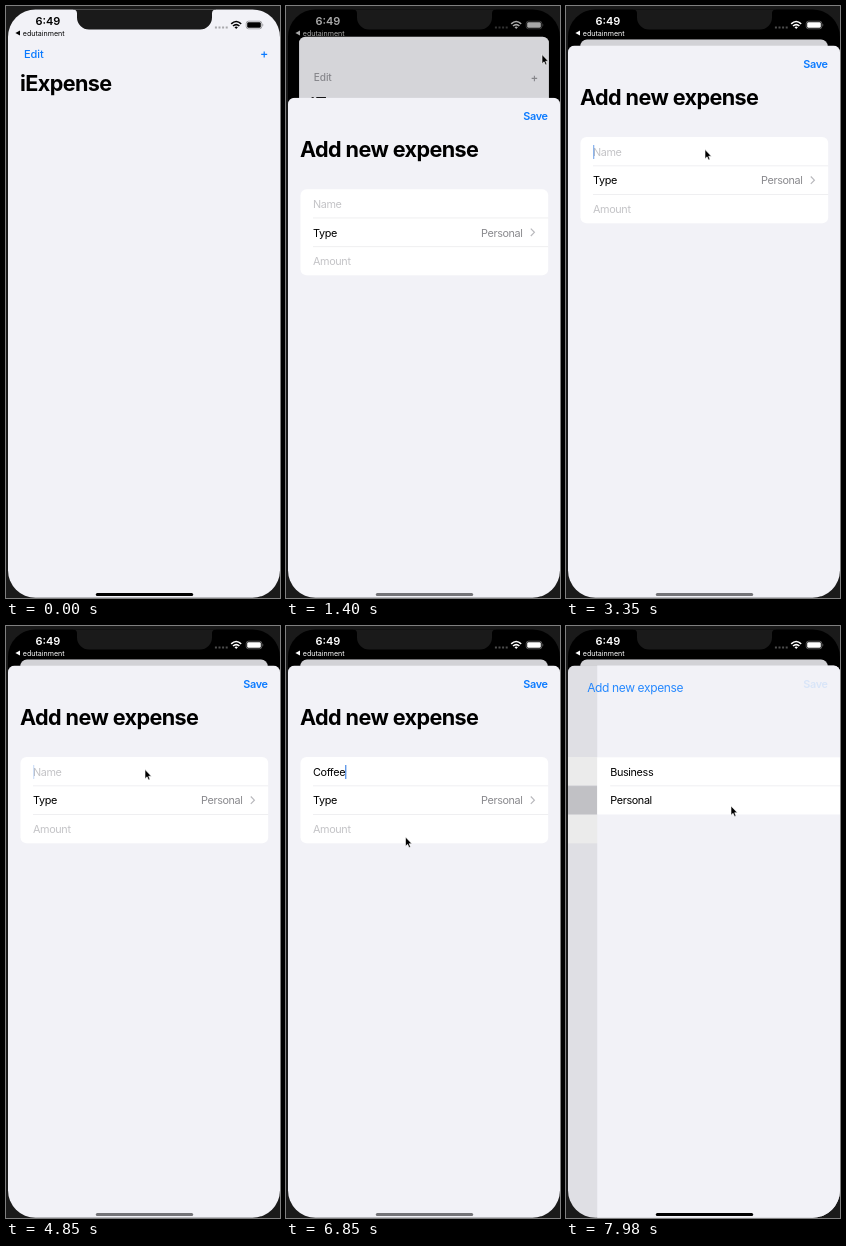
An HTML page that plays this animation: 274x592 px, repeating every 8 s.

```html
<!DOCTYPE html>
<html lang="en">
<head>
<meta charset="utf-8">
<title>Expense list</title>
<style>
html, body { margin: 0; width: 100%; height: 100%; overflow: hidden; background: #1a1a1a; }
svg { display: block; width: 274px; height: 592px; }
text { font: 400 10.85px Inter, "Open Sans", sans-serif; font-optical-sizing: none; letter-spacing: -.38px; white-space: pre; }
.title { font-size: 21.6px; font-weight: 700; letter-spacing: -.6px; }
.back { font-size: 21.6px; letter-spacing: -.66px; }
.strong { font-weight: 600; }
.edit { font-size: 11px; font-weight: 500; letter-spacing: -.1px; }
.clock { font-size: 11px; font-weight: 600; letter-spacing: 0; }
.small { font-size: 7.1px; letter-spacing: 0; }
.hint { fill: #c4c4c7; }
.value { fill: #8a8a8e; }
.link { fill: #0a7aff; }
.bg { fill: #f2f2f7; }
.rule { stroke: #e4e4e8; stroke-width: .6; }
</style>
</head>
<body>
<svg viewBox="0 0 274 592">
  <defs>
    <clipPath id="screen"><rect x="2" y="3.4" width="272" height="588.4" rx="27.5"/></clipPath>
    <clipPath id="sheetClip"><rect x="2" y="39.5" width="272" height="620" rx="6.5"/></clipPath>
  </defs>
  <rect width="274" height="592" fill="#1a1a1a"/>
  <g clip-path="url(#screen)">
    <rect width="274" height="592"/>
    <g id="page">
      <rect id="pageBg" class="bg" x="2" y="3" width="272" height="600"/>
      <g id="pageLinks">
        <text class="edit" x="18" y="51.7">Edit</text>
        <path d="M255.2 48.4h6M258.2 45.4v6" stroke="currentColor" stroke-width="1.2"/>
      </g>
      <text class="title" x="14" y="84.9">iExpense</text>
      <rect id="pageDim" x="2" y="3" width="272" height="600"/>
    </g>

    <g id="sheet"><g clip-path="url(#sheetClip)">
      <rect class="bg" x="2" y="39.5" width="272" height="620"/>
      <g id="form">
        <rect x="14.5" y="131" width="247.7" height="86.2" rx="6" fill="#fff"/>
        <rect id="picked" x="14.5" y="159.8" width="247.7" height="28.6" fill="#d1d1d6"/>
        <path class="rule" d="M27 159.8H262.2M27 188.5H262.2"/>
        <path d="M244.8 170.5l3.6 3.7-3.6 3.7" fill="none" stroke="#b9b9bd" stroke-width="1.2"/>
        <rect id="caret" y="139" width="1.3" height="14" fill="#1f6fde"/>
      </g>
      <rect id="formDim" x="2" y="39" width="272" height="560"/>
      <g id="detail">
        <rect class="bg" x="2" y="39" width="272" height="620"/>
        <rect x="2" y="131.3" width="272" height="57.2" fill="#fff"/>
        <path class="rule" d="M15 159.8H274"/>
      </g>
      <g id="heading">
        <text id="large" class="title">Add new expense</text>
        <text id="back" class="link back">Add new expense</text>
      </g>
      <text id="save" class="link strong" x="237.3" y="61.9">Save</text>
    </g></g>

    <g id="status">
      <text class="clock" x="29.5" y="18.8">6:49</text>
      <path d="M14 24.6v5l-4.6-2.5z"/>
      <text class="small" x="16.8" y="29.7">edutainment</text>
      <path d="M225.2 17.8q5-4.6 10 0M227 20q3.2-2.8 6.4 0" fill="none" stroke="currentColor" stroke-width="1.6"/>
      <path d="M230.2 23.1l-1.7-1.9q1.7-1.3 3.4 0z"/>
      <rect x="240.2" y="15.2" width="15.6" height="7.6" rx="2.2" fill="none" stroke="currentColor" stroke-opacity=".45" stroke-width=".7"/>
      <rect x="241.2" y="16.2" width="13.6" height="5.6" rx="1.3"/>
      <path d="M256.6 17.6q1.5 1.4 0 2.8z" opacity=".5"/>
      <path d="M208.9 21.6h13" stroke="currentColor" stroke-width="2" stroke-dasharray="2 1.6" opacity=".3"/>
    </g>
    <path d="M67 2v1.4q4 0 4 4v4.2a12 12 0 0 0 12 12h111a12 12 0 0 0 12-12v-4.2q0-4 4-4v-1.4z" fill="#1a1a1a"/>
    <rect id="home" x="89.8" y="587" width="97.4" height="3" rx="1.5"/>
  </g>
  <g id="pointer">
    <circle id="ring" r="14" fill="none" stroke="#222" stroke-width="1.2"/>
    <path d="M0 0V9.2L2.1 7.3 3.5 10.5 5 9.9 3.7 6.7H6.4Z" stroke="#fff" stroke-width=".6"/>
  </g>
</svg>
<script>
const $ = Object.fromEntries([...document.querySelectorAll('[id]')].map(e => [e.id, e]));
const LOOP = 8000, STEP = 50, WIDTH = 272, WORD = 'Coffee';

// Pointer: start point, then linear moves
const home = { x: 275, y: 42 };
const moves = [
  { from: 100, to: 500, x: 256, y: 48.5 },
  { from: 1400, to: 1600, x: 186, y: 93 },
  { from: 1600, to: 1850, x: 139, y: 143.5 },
  { from: 6400, to: 6850, x: 119.5, y: 211 },
  { from: 6950, to: 7600, x: 165, y: 180 }
];
const clicks = [850, 2000, 7600];

const clamp = (v, lo = 0, hi = 1) => Math.max(lo, Math.min(hi, v));
const mix = (a, b, k) => a + (b - a) * k;
const move = (el, x, y, s = 1) => el.setAttribute('transform', `translate(${x} ${y}) scale(${s})`);
const fade = (el, v) => el.setAttribute('opacity', v);

function tint(el, color) {
  el.setAttribute('fill', color);
  el.setAttribute('color', color);
}

function label(group, row, x, words, style = '') {
  const el = document.createElementNS('http://www.w3.org/2000/svg', 'text');
  el.setAttribute('class', style);
  el.setAttribute('x', x);
  el.setAttribute('y', 149.7 + 28.7 * row);
  el.textContent = words;
  group.insertBefore(el, group === $.form ? $.caret : null);
  return el;
}

const hint = label($.form, 0, 27, 'Name', 'hint');
const name = label($.form, 0, 27, '');
label($.form, 1, 27, 'Type');
label($.form, 1, 195, 'Personal', 'value');
label($.form, 2, 27, 'Amount', 'hint');
['Business', 'Personal'].forEach((word, row) => label($.detail, row, 15, word));

// Critically damped spring, 0 to 1
function spring(ms) {
  const x = Math.max(0, ms) * .01826;
  return 1 - (1 + x) * Math.exp(-x);
}

// Each second: quick fade out, pause, slow fade in
function blink(ms) {
  const p = ms % 1000;
  return p < 250 ? clamp(.4 - p / 125) : clamp((p - 250) / 200);
}

function pointerAt(t) {
  let { x, y } = home;
  for (const m of moves) {
    const k = clamp((t - m.from) / (m.to - m.from));
    x = mix(x, m.x, k);
    y = mix(y, m.y, k);
  }
  return [x, y];
}

function ringAt(t) {
  const age = t - clicks.findLast(c => c <= t);
  return age >= 0 ? .8 * clamp((250 - age) / 150) : 0;
}

function draw(t) {
  const up = t < 1250 ? 0 : spring(t - 1183);
  const push = spring(t - 7772);

  const scale = 1 - .09 * up;
  move($.page, 138 * (1 - scale), 3 + 30.6 * up - 3 * scale, scale);
  for (const el of [$.pageBg, $.pageDim]) el.setAttribute('rx', 7.5 * up);
  fade($.pageDim, .135 * up);
  tint($.pageLinks, up ? '#98989d' : '#0a7aff');
  const light = Math.round(255 * clamp((t - 1200) / 300));
  tint($.status, `rgb(${light},${light},${light})`);
  tint($.home, t >= 1250 && t < 7800 ? '#747478' : '#000');

  move($.sheet, 0, 552.5 * (1 - up));
  move($.form, -.3 * WIDTH * push, 0);
  fade($.formDim, .09 * push);
  move($.detail, WIDTH * (1 - push), 0);
  move($.heading, mix(14, 22, push), mix(98.9, 61.8, push), mix(1, .502, push));
  fade($.large, clamp(1 - push * 1.3));
  fade($.back, clamp(push * 1.15 - .15));
  fade($.save, 1 - push);
  fade($.picked, t >= 7700 ? 1 : 0);

  const typed = clamp(Math.floor((t - 5040) / 110), 0, WORD.length);
  name.textContent = WORD.slice(0, typed);
  fade(hint, typed ? 0 : 1);
  $.caret.setAttribute('x', 27 + (typed ? name.getComputedTextLength() : 0));
  const solid = typed && t < 6450;
  const lit = solid ? 1 : typed ? blink(t - 6450) : .5 * blink(t - 1850);
  fade($.caret, t >= 2150 && t < 7350 ? lit : 0);

  move($.pointer, ...pointerAt(t));
  fade($.ring, ringAt(t));
}

function tick() {
  const t = performance.now() % LOOP;
  draw(t >= 7980 ? 7980 : Math.floor(t / STEP) * STEP);
  requestAnimationFrame(tick);
}
tick();
</script>
</body>
</html>
```
